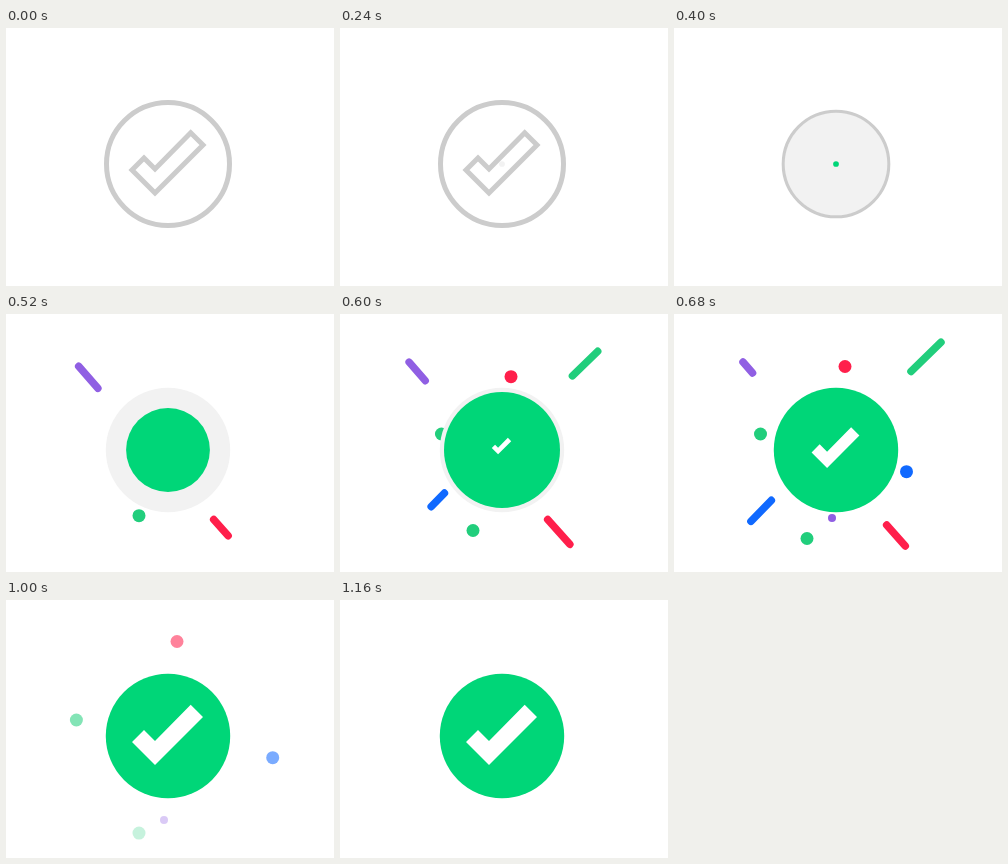
Recreate the animation shown at these times as an HTML page with a canvas. Size 328 by 258 pixels, loop 1240 ms.

```html
<!DOCTYPE html>
<html lang="en">
<head>
<meta charset="utf-8">
<title>Check mark burst</title>
<style>
html, body { margin: 0; width: 100%; height: 100%; overflow: hidden; background: #fff; }
canvas { display: block; }
</style>
</head>
<body>
<canvas id="stage" width="328" height="258"></canvas>
<script>
const ctx = document.getElementById('stage').getContext('2d');
const LOOP = 1240, STEP = 40;
const CX = 162, CY = 136, RADIUS = 62.2;
const GREEN = '#00d678', MINT = '#21ce7c', RED = '#ff1f4b', BLUE = '#1069ff', PURPLE = '#905fe3';
const CHECK = [[126, 142], [138, 130], [149, 141], [184.7, 104.8], [197, 117], [149, 165]];

// Each streak shoots out to (x, y); its tail follows from time `leave` on.
// The angle points from the outer end back towards the centre.
const streaks = [
  { color: PURPLE, x: 69, y: 48, angle: 49, length: 45, start: 400, leave: 440, time: 355 },
  { color: BLUE, x: 73, y: 211.3, angle: -45.7, length: 45, start: 560, leave: 600, time: 355 },
  { color: RED, x: 231.3, y: 232, angle: 228.3, length: 35.5, start: 455, leave: 640, time: 190 },
  { color: MINT, x: 268.3, y: 27, angle: 135.8, length: 50, start: 520, leave: 653, time: 213 }
];

// Each dot glides to rest at (x, y); dx, dy is the offset left at 680 ms.
const dots = [
  { color: MINT, x: 133, y: 233.9, dx: 0, dy: -9.4, r: 6.5, start: 440 },
  { color: PURPLE, x: 158, y: 221.6, dx: 0, dy: -17.6, r: 4, start: 460 },
  { color: RED, x: 171, y: 40.5, dx: 0, dy: 12, r: 6.5, start: 520 },
  { color: MINT, x: 68.9, y: 120, dx: 17.6, dy: 0, r: 6.5, start: 520 },
  { color: BLUE, x: 269.9, y: 157.7, dx: -37.4, dy: 0, r: 6.5, start: 520 }
];

// Share of a phase that has passed, from 0 to 1.
const progress = (t, start, time) => Math.min(1, Math.max(0, (t - start) / time));

// Sine ease-out, already just visible at its start time.
const grow = (t, start) => t < start ? 0 : Math.sin(progress(t, start - 8, 272) * Math.PI / 2);

function disc(r, color, x = CX, y = CY) {
  ctx.fillStyle = color;
  ctx.beginPath();
  ctx.arc(x, y, r, 0, 2 * Math.PI);
  ctx.fill();
}

function checkPath() {
  ctx.beginPath();
  CHECK.forEach(([x, y]) => ctx.lineTo(x, y));
  ctx.closePath();
}

function scaled(s, x, y, paint) {
  ctx.save();
  ctx.translate(x, y);
  ctx.scale(s, s);
  ctx.translate(-x, -y);
  paint();
  ctx.restore();
}

function drawOutline() {
  ctx.strokeStyle = '#ccc';
  ctx.lineWidth = 5;
  ctx.lineCap = 'butt';
  checkPath();
  ctx.stroke();
  ctx.beginPath();
  ctx.arc(CX, CY, 61.5, 0, 2 * Math.PI);
  ctx.stroke();
}

function drawCheck() {
  ctx.fillStyle = '#fff';
  checkPath();
  ctx.fill();
}

function drawStreak(s, t) {
  const head = s.length * (1 - progress(t, s.start, 240)) ** 3;
  const tail = s.length * (1 - progress(t, s.leave, s.time));
  if (tail <= head) return;
  const a = s.angle * Math.PI / 180, dx = Math.cos(a), dy = Math.sin(a);
  ctx.strokeStyle = s.color;
  ctx.lineWidth = 7.5;
  ctx.lineCap = 'round';
  ctx.beginPath();
  ctx.moveTo(s.x + dx * head, s.y + dy * head);
  ctx.lineTo(s.x + dx * tail, s.y + dy * tail);
  ctx.stroke();
}

function drawDot(d, t) {
  if (t < d.start) return;
  const left = Math.exp((680 - t) / 130);
  ctx.globalAlpha = 1 - progress(t, d.start + 360, 270);
  disc(d.r, d.color, d.x + d.dx * left, d.y + d.dy * left);
  ctx.globalAlpha = 1;
}

function draw(t) {
  ctx.fillStyle = '#fff';
  ctx.fillRect(0, 0, 328, 258);

  const shrink = progress(t, 240, 240);
  if (shrink < 1) scaled(1 - 0.34 * shrink ** 2, CX, CY, drawOutline);
  streaks.forEach(s => drawStreak(s, t));
  dots.forEach(d => drawDot(d, t));
  disc(RADIUS * grow(t, 240), '#f2f2f2');
  disc(RADIUS * grow(t, 400), GREEN);
  scaled(grow(t, 560), 161.5, 131, drawCheck);
}

function tick() {
  const t = performance.now() % LOOP;
  draw(Math.floor(t / STEP) * STEP);
  requestAnimationFrame(tick);
}
tick();
</script>
</body>
</html>
```
